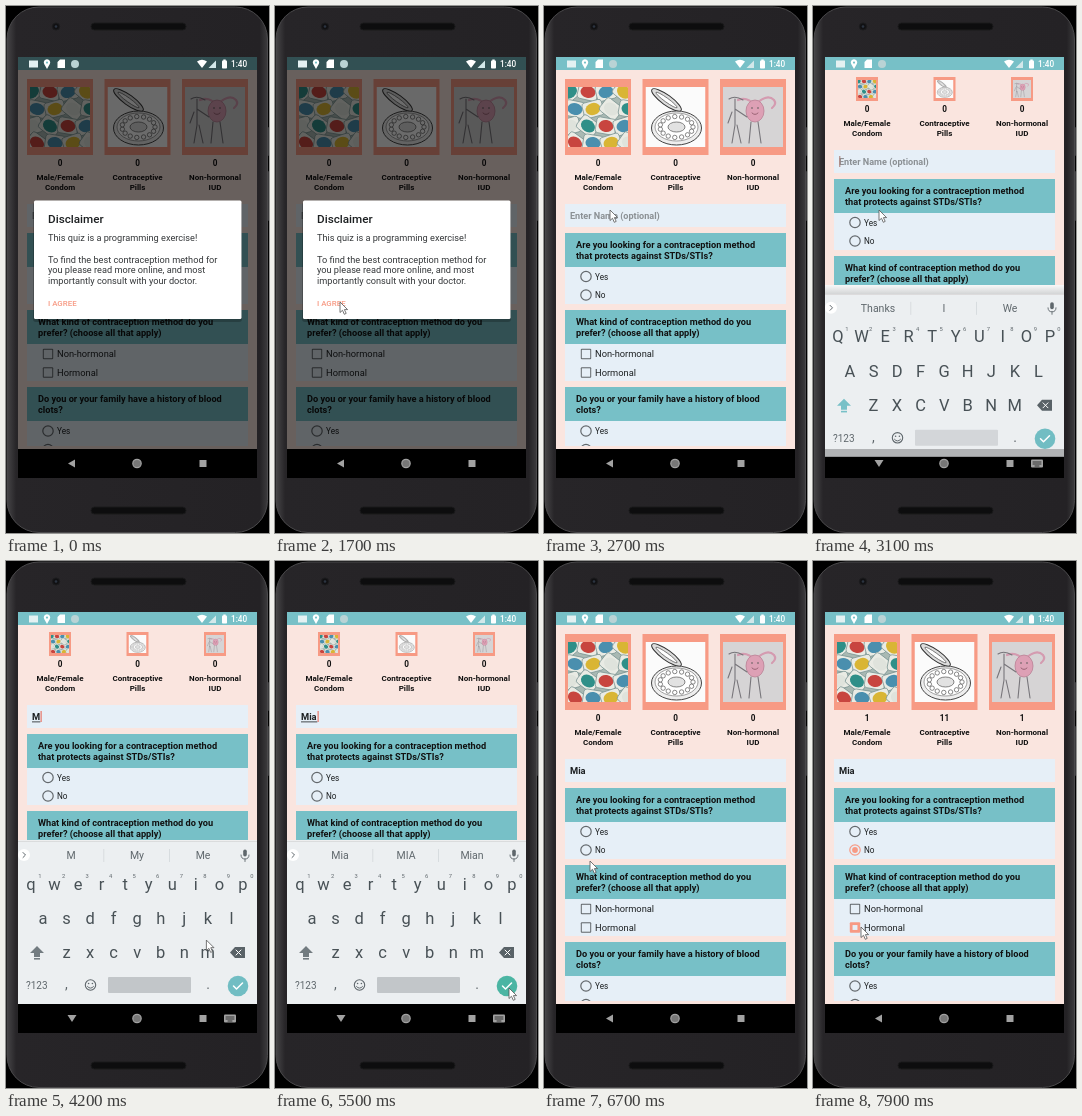
Animation, 263 px wide and 527 px high, one loop 8000 ms. Source, as an HTML page:

```html
<!DOCTYPE html>
<html lang="en">
<head>
<meta charset="utf-8">
<title>Quiz app demo</title>
<style>
html, body { margin: 0; width: 100%; height: 100%; overflow: hidden; background: #000; }
svg { display: block; width: 263px; height: 527px; font-family: Roboto, "Open Sans", sans-serif; }
</style>
</head>
<body>
<svg id="stage" viewBox="0 0 263 527"></svg>
<script>
const LOOP = 8000;
const TEAL = '#77c0c7', SALMON = '#f79a84', PINK = '#fae5df', PALE = '#e6eff7', INK = '#1d2022', GREY = '#5f676c';

// Moments of each interaction
const AGREE = 1780, FOCUS = 2850, TYPED = [4050, 4550, 5050], DONE = 5600, PICK_NO = 7100, PICK_HORMONAL = 7830;
const NAME = 'Mia';
const HINTS = [['Thanks', 'I', 'We'], ['M', 'My', 'Me'], ['Mi', 'MI', 'Mid'], ['Mia', 'MIA', 'Mian']];

// Pointer stops: time, x, y
const PATH = [
  [500, 238, 472], [1400, 65, 296], [2150, 65, 296], [2600, 66, 204], [3250, 66, 204],
  [3850, 203, 393], [4100, 203, 393], [4450, 190, 324], [4600, 190, 324], [4950, 38, 357],
  [5080, 38, 357], [5430, 234, 427], [5800, 234, 427], [6400, 46, 300], [6750, 46, 300],
  [6980, 43, 288], [7250, 43, 288], [7650, 48, 366], [LOOP, 48, 366]
];

const clamp = v => Math.max(0, Math.min(1, v));
const progress = (t, start, length) => clamp((t - start) / length);
const smooth = p => p * p * (3 - 2 * p);
const mix = (a, b, p) => a + (b - a) * p;

const rect = (x, y, w, h, fill, more = '') =>
  `<rect x="${x}" y="${y}" width="${w}" height="${h}" fill="${fill}" ${more}/>`;
const dot = (x, y, r, fill, more = '') => `<circle cx="${x}" cy="${y}" r="${r}" fill="${fill}" ${more}/>`;
const oval = (x, y, rx, ry, fill, more = '') =>
  `<ellipse cx="${x}" cy="${y}" rx="${rx}" ry="${ry}" fill="${fill}" ${more}/>`;
const path = (d, fill, more = '') => `<path d="${d}" fill="${fill}" ${more}/>`;
const line = (d, color, width = 1) =>
  path(d, 'none', `stroke="${color}" stroke-width="${width}" stroke-linecap="round" stroke-linejoin="round"`);
const text = (s, x, y, size, fill = INK, weight = 400, anchor = 'start') =>
  `<text x="${x}" y="${y}" font-size="${size}" fill="${fill}" font-weight="${weight}" text-anchor="${anchor}">${s}</text>`;
const group = (x, y, inner, scale = 1) => `<g transform="translate(${x} ${y}) scale(${scale})">${inner}</g>`;

function packets() {
  const colors = ['#2f8f88', '#d9b534', '#c8453f', '#dfe3dc', '#4a8fae'];
  let out = rect(0, 0, 60, 60, '#a9b9b3');
  for (let i = 0; i < 16; i++) {
    const row = i >> 2, x = 2 + i % 4 * 18 + row % 2 * 5, y = 5 + row * 17;
    out += `<g transform="rotate(${i * 53 % 80 - 40} ${x} ${y})">` +
      rect(x - 10, y - 8, 20, 16, '#e9ebe4', 'rx="3" stroke="#75908f" stroke-width=".7"') +
      oval(x, y, 7.5, 6, colors[(i * 2 + row) % 5]) + '</g>';
  }
  return out;
}

function pills() {
  let out = rect(0, 0, 60, 60, '#fbfbfb') +
    `<g transform="rotate(36 21 13)">` + oval(21, 13, 18, 5, '#ddd', 'stroke="#333"') +
    oval(21, 13, 13, 2, '#fff', 'stroke="#555" stroke-width=".7"') + '</g>' +
    oval(31, 41, 25, 17, '#eee', 'stroke="#444"') + oval(31, 40, 21.5, 14, '#fff', 'stroke="#777" stroke-width=".7"');
  for (let i = 0; i < 15; i++) {
    const a = i / 15 * Math.PI * 2;
    out += dot(31 + 16.5 * Math.cos(a), 40 + 10.5 * Math.sin(a), 2.2, '#fff', 'stroke="#555" stroke-width=".7"');
  }
  return out + oval(31, 40, 8.5, 5, '#e2e2e2', 'stroke="#555" stroke-width=".7"');
}

function doodle() {
  return rect(0, 0, 60, 60, '#d6d4d5') +
    line('M32 18Q24 9 15 13M32 18Q44 6 51 13Q54 17 49 21', '#d49bb0', 2.2) +
    oval(32, 24, 9, 11, '#dda0b5', 'stroke="#b98195" stroke-width=".8"') +
    line('M6 12Q12 8 20 13M12 12V38M12 38L9 56M14 38L18 56M28 35L26 56M35 35L38 56M12 22L24 30M9 25L5 36', '#77757a', 1.1) +
    dot(29, 21, .8, '#555') + dot(35, 21, .8, '#555') + line('M29 26Q32 29 35 26', '#8a5464', .8);
}

const PICTURES = [packets(), pills(), doodle()].map(p => `<g clip-path="url(#photo)">${p}</g>`);
const LABELS = [['Male/Female', 'Condom'], ['Contraceptive', 'Pills'], ['Non-hormonal', 'IUD']];

const phone =
  rect(260, 121, 3, 29, '#3a3a3c', 'rx="1"') + rect(260, 165, 3, 50, '#3a3a3c', 'rx="1"') +
  rect(1, 1, 260.5, 525.5, 'url(#shell)', 'rx="32" stroke="#4b4a4c"') +
  dot(50, 20.5, 3.6, '#111113', 'stroke="#1c1c1e"') + dot(50, 20.5, 1.3, '#2b3440') +
  rect(85, 17, 95, 7, '#0d0d0e', 'rx="3.5" stroke="#1a1a1b"') +
  rect(85, 501, 95, 7, '#0d0d0e', 'rx="3.5" stroke="#1a1a1b"') +
  rect(12, 51, 239, 421, '#000');

const statusIcons =
  rect(23, 54.5, 9, 7, '#e4f1f2') +
  path('M41 63L38.2 58A3.2 3.2 0 1 1 43.8 58Z', '#fff') + dot(41, 56.6, 1.1, TEAL) +
  path('M54 53.5H59V62H51.5V56Z', '#fff') +
  dot(69, 58, 4, '#b9d3d5') +
  path('M191 55.5Q196 52 201 55.5L196 62Z', '#fff') +
  path('M202.500 62H210V54.500Z', '#d3e8ea') +
  rect(216, 54.5, 5, 8, '#fff', 'rx=".8"') + rect(217.3, 53.5, 2.4, 2, '#fff') +
  text('1:40', 225, 61.2, 8.2, '#fff', 500);

function radio(x, y, label, on) {
  const color = on ? SALMON : '#63686c';
  return dot(x, y, 5.2, 'none', `stroke="${color}" stroke-width="1.2"`) +
    (on ? dot(x, y, 2.9, SALMON) : '') + text(label, 51, y + 3, 8.2);
}

function checkbox(x, y, label, fill) {
  const hole = mix(8.4, 0, fill), color = fill ? SALMON : '#63686c';
  return rect(x - 5.2, y - 5.2, 10.4, 10.4, color, 'rx="1"') +
    rect(x - hole / 2, y - hole / 2, hole, hole, PALE) + text(label, 51, y + 3.3, 9.3);
}

const card = (y, title, rows) =>
  rect(21, y, 221, 34, TEAL) + rect(21, y + 34, 221, 37, PALE) +
  title.map((s, i) => text(s, 32, y + 15 + i * 11, 9.2, '#111', 700)).join('') + rows;

function nameField(t) {
  const typed = TYPED.filter(k => t >= k).length;
  const word = NAME.slice(0, typed);
  const end = 26 + [0, 8.3, 10.8, 16.3][typed];
  const since = t - [1850, FOCUS, ...TYPED].filter(k => t >= k).pop();
  let out = rect(21, 198, 221, 23, PALE);
  out += typed ? text(word, 26, 213, 9.3, INK, 700) : text('Enter Name (optional)', 26, 213, 9.1, '#8b9094', 700);
  if (t < DONE && typed) out += rect(26, 214.5, end - 26, .8, INK);
  if (t < DONE && since % 1000 < 500) out += rect(end + .3, 204, 1, 11, typed ? '#e8604e' : '#a9786e');
  return out;
}

function page(t) {
  const small = t >= FOCUS && t < DONE;
  const counts = t >= PICK_HORMONAL ? [1, 11, 1] : t >= PICK_NO ? [1, 1, 1] : [0, 0, 0];
  const fill = t < PICK_HORMONAL ? 0 : mix(.25, .6, progress(t, PICK_HORMONAL, 150));
  let top = '', body = '';
  PICTURES.forEach((pic, i) => {
    const x = 54 + i * 77.5;
    top += small
      ? rect(x - 11, 71, 22, 24, SALMON) + group(x - 9, 74, pic, .3)
      : rect(x - 33, 73, 66, 76, SALMON) + group(x - 30, 81, pic);
    body += text(counts[i], x, 160, 8.2, '#111', 700, 'middle') +
      LABELS[i].map((s, j) => text(s, x, 174 + j * 9.7, 8, '#111', 700, 'middle')).join('');
  });
  body += nameField(t) +
    card(227, ['Are you looking for a contraception method', 'that protects against STDs/STIs?'],
      radio(42, 270.5, 'Yes', false) + radio(42, 289, 'No', t >= PICK_NO)) +
    card(304, ['What kind of contraception method do you', 'prefer? (choose all that apply)'],
      checkbox(42, 348, 'Non-hormonal', 0) + checkbox(42, 366.5, 'Hormonal', fill)) +
    card(381, ['Do you or your family have a history of blood', 'clots?'],
      radio(42, 425, 'Yes', false) + radio(42, 443.5, 'No', false));
  return rect(12, 51, 239, 392, PINK) + top +
    `<g clip-path="url(#${small ? 'short' : 'tall'})">${group(0, small ? -54 : 0, body)}</g>` +
    rect(12, 51, 239, 13, TEAL);
}

function keyboard(t) {
  if (t < FOCUS || t > DONE + 200) return '';
  const up = progress(t, FOCUS, 350);
  const drop = t < DONE ? 162 * (1 - up) ** 2.4 : 162 * progress(t, DONE, 200) ** 2;
  const typed = TYPED.filter(k => t >= k).length, caps = !typed;
  const key = (s, x, y) => text(caps ? s.toUpperCase() : s, x, y, 16.5, '#485156', 400, 'middle');
  const row = (keys, x, y) => [...keys].map((s, i) => key(s, x + i * 23.55, y)).join('');
  const digits = [...'1234567890'].map((s, i) => text(s, 34 + i * 23.55, 317, 5.8, GREY, 400, 'middle')).join('');
  const hints = HINTS[typed].map((s, i) => text(s, 65 + i * 66, 298, 10.5, GREY, 400, 'middle')).join('');
  const shift = path('M31 385L38 392H34V396H28V392H24Z', caps ? TEAL : '#727b80') +
    rect(28, 397, 6, 1.6, caps ? TEAL : '#727b80');
  const erase = path('M229 386H239V397H229L224 391.500Z', '#596267') + line('M230 389L235 394M235 389L230 394', '#fff');
  const smiley = dot(84.5, 424, 5.2, 'none', `stroke="${GREY}" stroke-width="1.1"`) +
    dot(82.6, 422.5, .8, GREY) + dot(86.4, 422.5, .8, GREY) + line('M81.500 425.500Q84.500 429 87.500 425.500', GREY);
  const mic = rect(237.2, 288.5, 3.6, 7, GREY, 'rx="1.8"') + line('M235 294Q235 298 239 298Q243 298 243 294M239 298V300.500', GREY, .9);
  const gap = t < DONE ? rect(12, 279, 239, 2 + drop, 'url(#fade)') : '';
  return gap + group(0, drop,
    rect(12, 281, 239, 162, '#eceff1') +
    dot(18, 294, 6, '#fff') + line('M17 291.500L19.500 294L17 296.500', GREY) + mic +
    rect(97.5, 288, .7, 13, '#cfd4d7') + rect(163, 288, .7, 13, '#cfd4d7') + hints +
    row('qwertyuiop', 25, 328.5) + digits + row('asdfghjkl', 37, 363) + row('zxcvbnm', 60.5, 397) +
    shift + erase + smiley +
    text('?123', 20, 428, 10, GREY) + text(',', 60.5, 428, 14, GREY, 400, 'middle') + text('.', 202, 428, 14, GREY, 400, 'middle') +
    rect(102, 416, 83, 16, caps ? '#d3d6d9' : '#c2c6c9', 'rx="1"') +
    dot(232, 425, 10.3, t > 5450 ? '#4bb5a3' : '#71bdc3') + line('M227.500 425L230.500 428L236.500 422', '#fff', 1.5));
}

function navIcons(t) {
  const open = t >= FOCUS && t < DONE;
  const tone = '#a2a2a2';
  return path(open ? 'M61.500 454H70.500L66 461Z' : 'M69 453.500V461.500L62 457.500Z', tone) +
    dot(131, 457.5, 4.2, '#777', `stroke="${tone}" stroke-width="1.2"`) +
    rect(193.5, 454, 7, 7, tone) +
    (open ? rect(218, 453.5, 12, 8, tone, 'rx="1"') +
      line('M220 456H228M220 458H228', '#000', .7) + line('M222 460H226', '#000', .7) : '');
}

// The sliding keyboard shows through the tinted navigation bar
const navBar = t => rect(12, 443, 239, 29, '#000') + keyboard(t) +
  rect(12, 443, 239, 29, '#000', 'opacity=".25"') + navIcons(t);

function dialog(t) {
  const shown = 1 - progress(t, AGREE, 110);
  if (!shown) return '';
  const body = ['This quiz is a programming exercise!', '', 'To find the best contraception method for',
    'you please read more online, and most', 'importantly consult with your doctor.'];
  return `<g opacity="${shown}">` + rect(12, 51, 239, 392, '#000', 'opacity=".58"') +
    rect(27, 196, 209, 120, '#000', 'rx="3" opacity=".22"') + rect(28, 194.5, 207.5, 118.5, '#fff', 'rx="1.5"') +
    text('Disclaimer', 42, 217, 11.7, INK, 500) +
    body.map((s, i) => text(s, 42, 235 + i * 10.8, 9.2, '#35383a')).join('') +
    text('I AGREE', 42, 299.5, 7.9, SALMON, 500) + '</g>';
}

function pointer(t) {
  if (t < PATH[0][0]) return '';
  const i = PATH.findIndex(stop => stop[0] > t);
  const [t0, x0, y0] = PATH[i - 1], [t1, x1, y1] = PATH[i];
  const p = smooth(progress(t, t0, t1 - t0));
  return group(mix(x0, x1, p), mix(y0, y1, p),
    path('M0 0V10.500L2.500 8.300L4.300 12.300L6.200 11.400L4.400 7.600H7.600Z', '#fff', 'stroke="#555" stroke-width=".8"'));
}

const clip = (id, x, y, w, h) => `<clipPath id="${id}">${rect(x, y, w, h, '#000')}</clipPath>`;
const gradient = (id, vertical, stops) =>
  `<linearGradient id="${id}" x2="${vertical ? 0 : 1}" y2="${vertical ? 1 : 0}">` +
  stops.map(([at, color]) => `<stop offset="${at}" stop-color="${color}"/>`).join('') + '</linearGradient>';
const defs = '<defs>' + clip('screen', 12, 51, 239, 421) + clip('tall', 12, 64, 239, 376) +
  clip('short', 12, 64, 239, 215) + clip('photo', 0, 0, 60, 60) +
  gradient('shell', false, [[0, '#464547'], [.035, '#272528'], [.97, '#242225'], [1, '#3c3b3d']]) +
  gradient('fade', true, [[0, '#f8f8f8'], [1, '#d0d2d3']]) + '</defs>';
const stage = document.getElementById('stage');
const start = performance.now();

function draw() {
  const t = (performance.now() - start) % LOOP;
  stage.innerHTML = defs + phone +
    `<g clip-path="url(#screen)">${page(t) + navBar(t) + dialog(t) + statusIcons}</g>` + pointer(t);
  requestAnimationFrame(draw);
}
draw();
</script>
</body>
</html>
```
